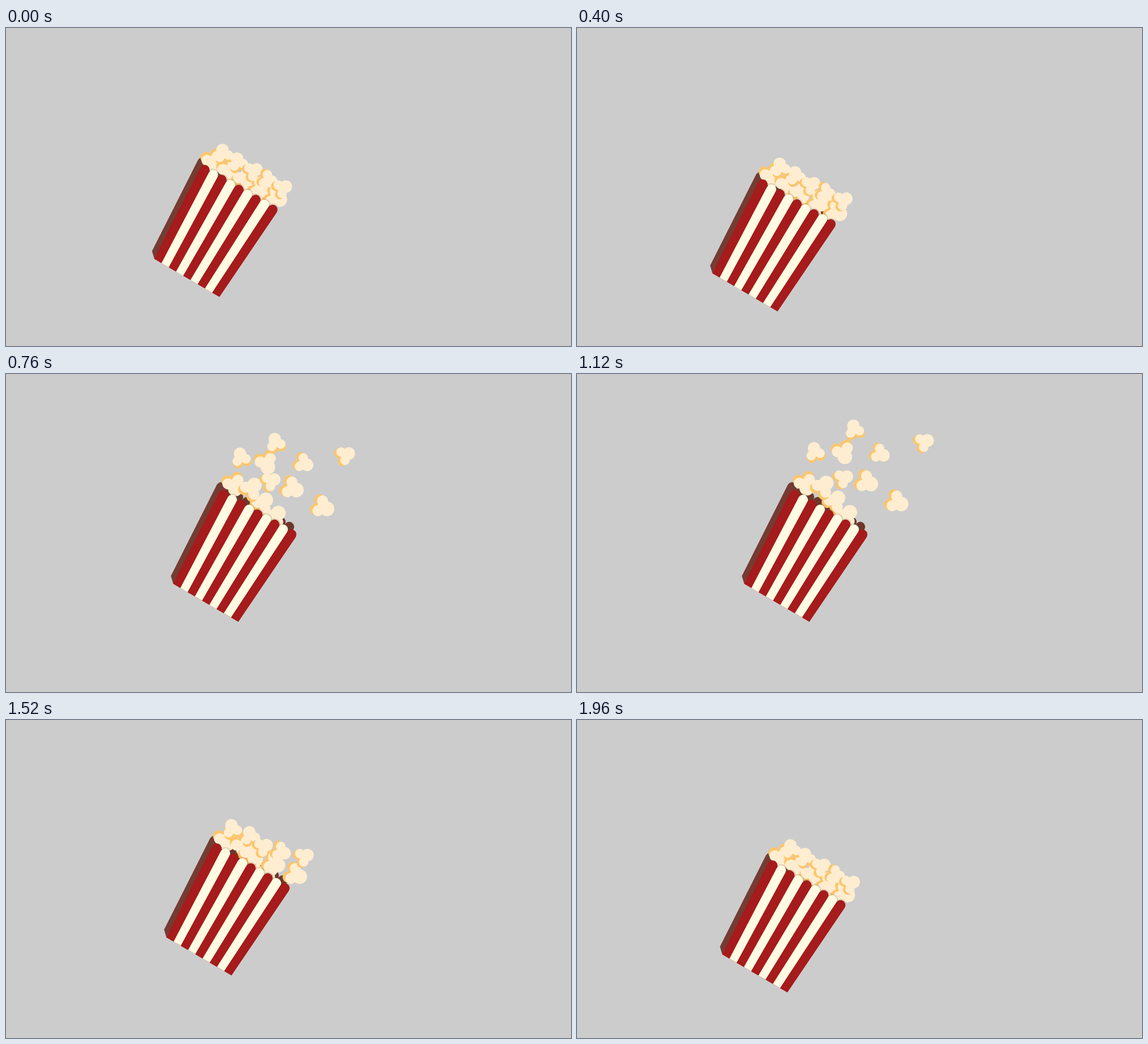
An HTML page with a canvas that plays this animation: 998 by 561 pixels, repeating every 2 s.

```html
<!DOCTYPE html>
<html lang="en">
<head>
<meta charset="utf-8">
<title>Popcorn</title>
<style>
  html, body { margin: 0; width: 100%; height: 100%; overflow: hidden; background: #ccc; }
  canvas { display: block; width: 998px; height: 561px; }
</style>
</head>
<body>
<canvas id="stage" width="998" height="561"></canvas>
<script>
const ctx = document.getElementById('stage').getContext('2d');
const LOOP = 2000, STEP = 40, STRIPES = 9;
const RED = '#a61b1b', CREAM = '#fffbe3', CORN = '#feedd0', GOLD = '#fdc56b';
const SIDE = '#743c33', INSIDE = '#6e372c';

const front = { bl: [295.3, 370], br: [410.3, 437], tl: [376.8, 208.6], tr: [511.8, 287.4] };
const back = Object.fromEntries(
  Object.entries(front).map(([k, [x, y]]) => [k, [x - 4, y - 13.5]]));

// Kernels rest in even rows along the rim: gap and shift along it, height above it.
// Each one is [along, height, degrees] at the top of its flight.
const rim = { x: 445, y: 245, tilt: 30.26 * Math.PI / 180 };
const rows = [
  { gap: 31, shift: 0, height: 4, size: 1.05, first: 2, tops: [[-1, 25, -50], [30, 12, -50]] },
  { gap: 32, shift: 0, height: 18, size: 1.05, first: 0,
    tops: [[-62, 24, 70], [-32, 118, 70], [-32, 37, -50], [30, 88, 25], [94, 83, 25]] },
  { gap: 30, shift: 6, height: 38, size: .9, first: 0,
    tops: [[-75, 87, -105], [-35, 166, -105], [-9, 69, -25], [25, 147, 25], [82, 208, -25]] }
];

const mix = (a, b, f) => a + (b - a) * f;
const mixPt = (p, q, f) => [mix(p[0], q[0], f), mix(p[1], q[1], f)];

function ease(t, from, to) {
  const u = Math.min(1, Math.max(0, (t - from) / (to - from)));
  return (1 - Math.cos(Math.PI * u)) / 2;
}

// 0 = bag held high, 1 = bag at its lowest
function bagDrop(t) {
  if (t < 45) t += LOOP;
  if (t < 350) return mix(.5, 1, ease(t, 45, 350));
  if (t < 1308) return 1 - ease(t, 350, 600);
  if (t < 1790) return ((t - 1308) / 482) ** 2;
  return mix(1, .5, ease(t, 1790, 2045));
}

const toss = t => ease(t, 324, 978) - ease(t, 980, 1694);

function poly(points, color) {
  ctx.fillStyle = color;
  ctx.beginPath();
  points.forEach(p => ctx.lineTo(p[0], p[1]));
  ctx.fill();
}

function dot(x, y, r, color) {
  ctx.fillStyle = color;
  ctx.beginPath();
  ctx.arc(x, y, r, 0, 7);
  ctx.fill();
}

// One stripe with a round top
function stripe(face, i, color, grow = 0) {
  const a = mixPt(face.tl, face.tr, i / STRIPES), b = mixPt(face.tl, face.tr, (i + 1) / STRIPES);
  const c = mixPt(face.bl, face.br, (i + 1) / STRIPES), d = mixPt(face.bl, face.br, i / STRIPES);
  const mid = mixPt(a, b, .5), r = Math.hypot(b[0] - a[0], b[1] - a[1]) / 2 + grow;
  ctx.fillStyle = color;
  ctx.beginPath();
  ctx.moveTo(...d);
  ctx.lineTo(...a);
  ctx.arc(...mid, r, rim.tilt + Math.PI, rim.tilt);
  ctx.lineTo(...c);
  ctx.fill();
}

// A big lobe ahead, two small ones behind, and a golden edge at the rear
function kernel(x, y, angle, size) {
  ctx.save();
  ctx.translate(x, y);
  ctx.rotate(angle * Math.PI / 180);
  ctx.scale(size, size);
  for (const [shift, color] of [[-5, GOLD], [0, CORN]]) {
    for (const side of [-1, 1]) dot(shift - 4.5, 9 * side, 9.3, color);
    dot(shift, 0, 9, color);
  }
  dot(8, 0, 12.3, CORN);
  ctx.restore();
}

function drawRow(row, q) {
  row.tops.forEach(([along, height, angle], i) => {
    const col = row.first + i;
    // Sideways spread comes early; kernels on the right rise first
    const u = mix((col - 2) * row.gap + row.shift, along, 1 - (1 - q) ** 3);
    const v = mix(row.height, height, q ** (1.6 - .15 * col));
    const c = Math.cos(rim.tilt), s = Math.sin(rim.tilt);
    kernel(rim.x + u * c + v * s, rim.y + u * s - v * c, angle, row.size);
  });
}

function draw(t) {
  const drop = bagDrop(t), q = toss(t);
  ctx.clearRect(0, 0, 998, 561);
  ctx.save();
  ctx.translate(-62 * drop, 69.5 * drop);

  for (let i = 0; i < STRIPES; i++) stripe(back, i, i ? INSIDE : SIDE);
  poly([front.bl, back.bl, back.tl, mixPt(back.tl, back.tr, .1), front.tl], SIDE);

  rows.forEach(row => drawRow(row, q));

  // Soft shade of the rim, only where something lies behind it
  ctx.globalCompositeOperation = 'source-atop';
  for (let i = 1; i < STRIPES; i++) stripe(front, i, 'rgba(90,60,40,.16)', 2.2);
  ctx.globalCompositeOperation = 'source-over';

  poly([front.bl, front.br, front.tr, front.tl], RED);
  for (let i = 0; i < STRIPES; i++) stripe(front, i, i % 2 ? CREAM : RED);
  ctx.restore();
}

const start = performance.now();
function tick() {
  const t = (performance.now() - start) % LOOP;
  draw(Math.floor(t / STEP) * STEP);
  requestAnimationFrame(tick);
}
tick();
</script>
</body>
</html>
```
